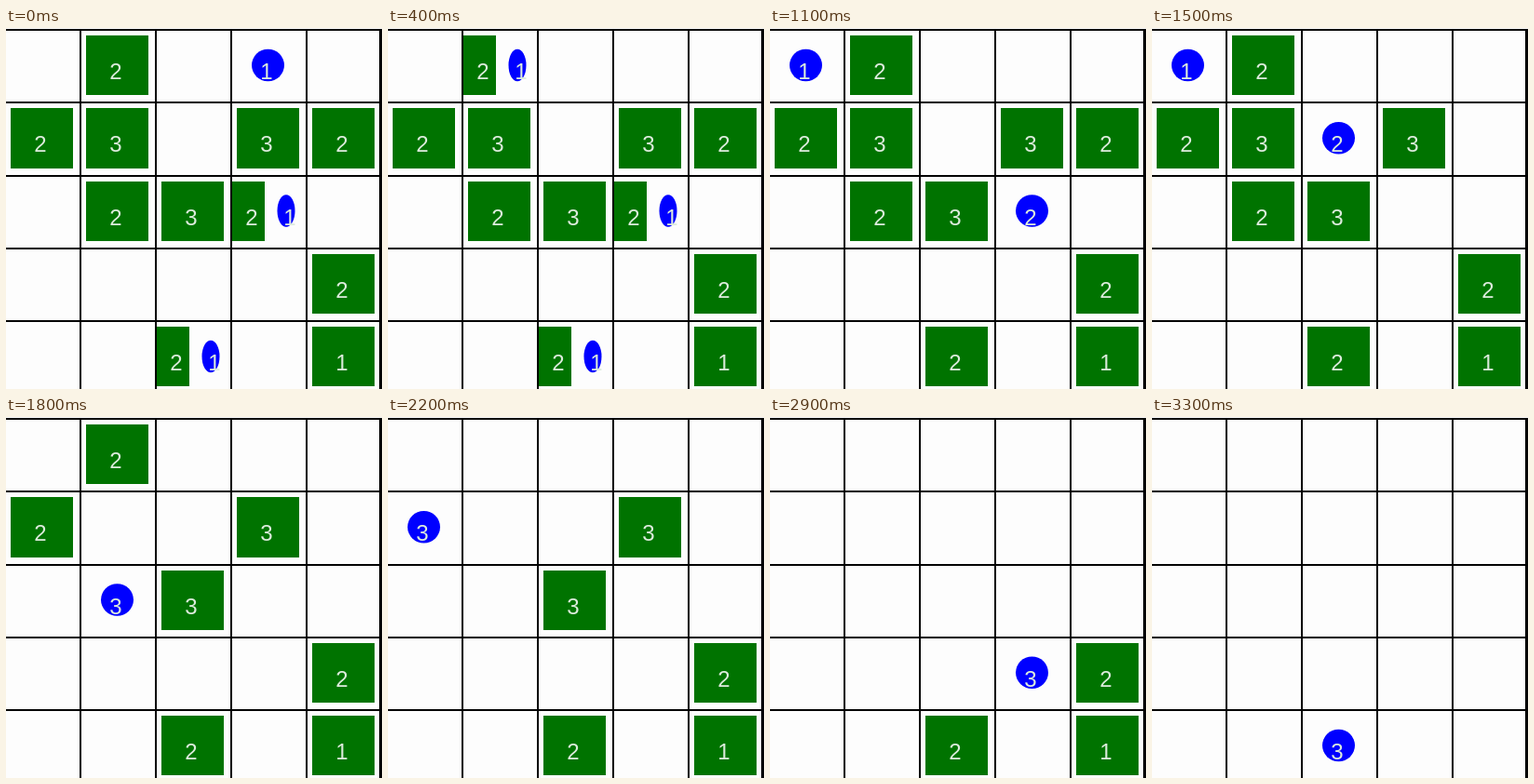
An HTML page with a canvas for the animation above (3.4 s loop, 404x388 px).

```html
<!DOCTYPE html>
<html lang="en">
<head>
<meta charset="utf-8">
<title>Grid foraging</title>
<style>
  html, body { margin: 0; width: 100%; height: 100%; overflow: hidden; background: #fdfdfd; }
  canvas { display: block; }
</style>
</head>
<body>
<canvas id="stage" width="404" height="388"></canvas>
<script>
const ctx = document.getElementById('stage').getContext('2d');
const STEP = 100, COL = 81, ROW = 78.25;
const GREEN = '#007300', BLUE = '#0000ff', INK = '#dcebdc';

// Cells are written as row and column; a box holds the crew size it needs.
const boxes = {
  '01': 2, '10': 2, '11': 3, '13': 3, '14': 2, '21': 2,
  '22': 3, '23': 2, '34': 2, '42': 2, '44': 1
};

const path = text => text.trim().split(/\s+/);
const together = path('11 21 11 01 11 10 11 12 13 23 22 32 33 34 44 43 42');
const pair = path('13 14 13 12 11');
const walkers = [
  [...path('03 02' + ' 01 00'.repeat(7) + ' 01'), ...together],
  [...path('23 '.repeat(12)), ...pair, ...together],
  [...path('42 32 '.repeat(5) + '33 23'), ...pair, ...together]
];

// Play the rules once: a box vanishes when enough walkers stand on it.
const left = { ...boxes };
const states = walkers[0].map((_, i) => {
  const crew = {};
  for (const w of walkers) crew[w[i]] = (crew[w[i]] || 0) + 1;
  for (const cell in crew) if (crew[cell] >= left[cell]) delete left[cell];
  return { crew, boxes: { ...left } };
});

function digit(n, x, y) {
  ctx.fillStyle = INK;
  ctx.fillText(n, x, y + 55);
}

function origin(cell) {
  return [cell[1] * COL, cell[0] * ROW];
}

function drawBox(cell, need, shared) {
  const [x, y] = origin(cell);
  const top = Math.round(y + 8);
  ctx.fillStyle = GREEN;
  ctx.fillRect(x + (shared ? 0 : 5), top, shared ? 35 : 67, Math.round(y + 72.4) - top);
  digit(need, x + (shared ? 21 : 37), y);
}

function drawCrew(cell, count, shared) {
  const [x, y] = origin(cell);
  ctx.fillStyle = BLUE;
  ctx.beginPath();
  ctx.ellipse(x + (shared ? 58 : 38.5), y + 40, shared ? 9.5 : 17.5, 17.3, 0, 0, 7);
  ctx.fill();
  digit(count, x + (shared ? 62 : 37), y);
}

function drawGrid() {
  ctx.fillStyle = '#fdfdfd';
  ctx.fillRect(0, 0, 404, 388);
  ctx.fillStyle = '#000';
  for (let i = 0; i < 5; i++) {
    ctx.fillRect(0, Math.round(1 + i * ROW), 404, 2);
    ctx.fillRect(i < 4 ? 79 + i * COL : 401, 1, i < 4 ? 2 : 3, 387);
  }
}

function draw(now) {
  const { crew, boxes } = states[Math.floor(now / STEP) % states.length];
  drawGrid();
  ctx.font = '24px "Liberation Sans", Arial, sans-serif';
  ctx.textAlign = 'center';
  for (const cell in boxes) drawBox(cell, boxes[cell], cell in crew);
  for (const cell in crew) drawCrew(cell, crew[cell], cell in boxes);
}

const start = performance.now();
function tick() {
  draw(performance.now() - start);
  requestAnimationFrame(tick);
}
tick();
</script>
</body>
</html>
```
